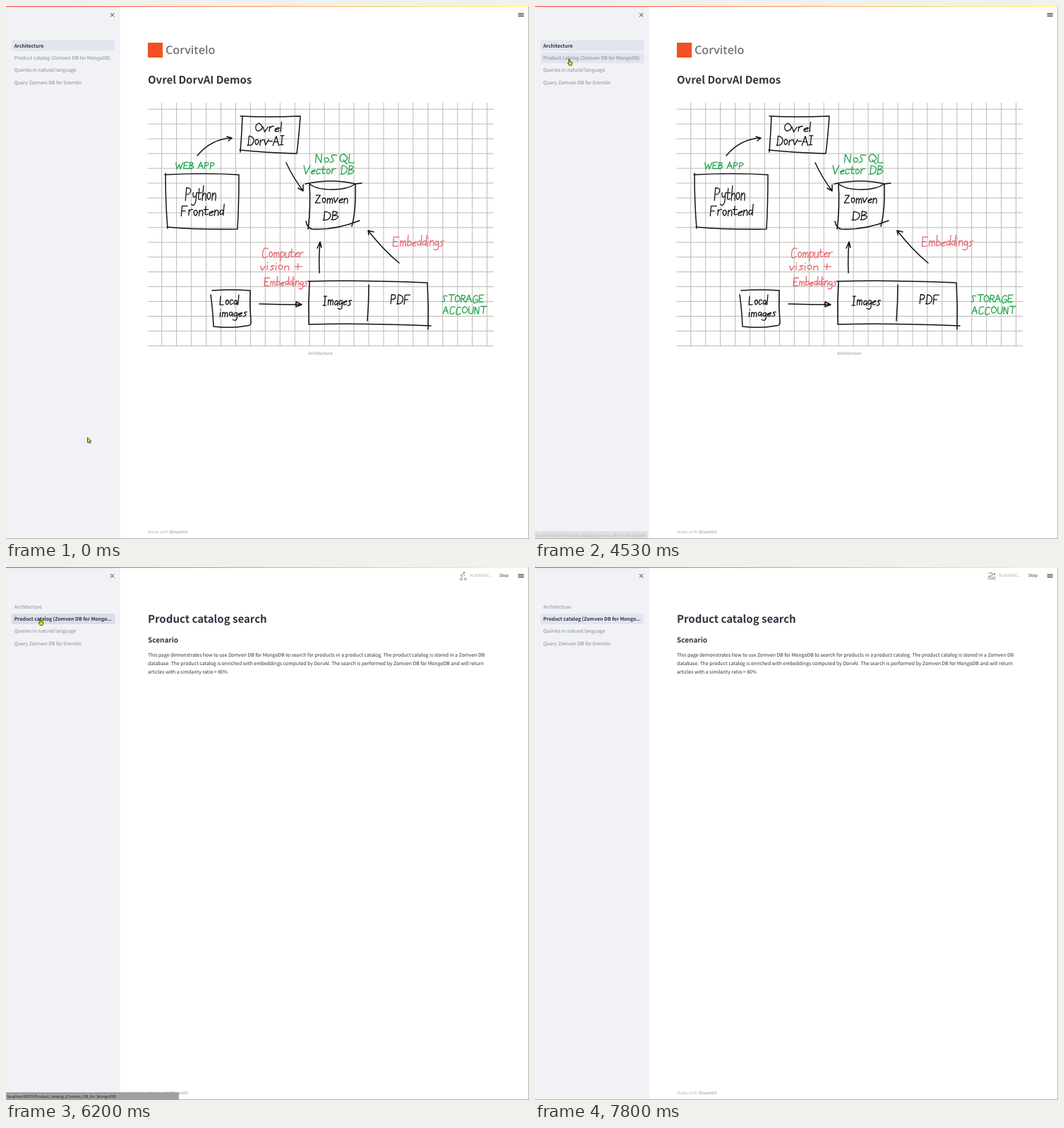
An HTML page with a canvas that plays this animation: 741 by 755 pixels, repeating every 8000 ms.

```html
<!DOCTYPE html>
<html lang="en">
<head>
<meta charset="utf-8">
<title>Demo app</title>
<style>
html, body { margin: 0; width: 741px; height: 755px; overflow: hidden; background: #fff; }
canvas { display: block; }
</style>
</head>
<body>
<canvas id="stage" width="741" height="755"></canvas>
<script>
const ctx = document.getElementById('stage').getContext('2d');
const LOOP = 8000;
const SANS = '"Noto Sans CJK SC", "Noto Sans CJK JP", "Noto Sans CJK", "Noto Sans", sans-serif';
const OPEN = '"Open Sans", "Noto Sans", sans-serif';
const INK = '#31333f', SOFT = 'rgba(49,51,63,.55)', FAINT = 'rgba(49,51,63,.36)';
const BLACK = '#111', GREEN = '#1fa34a', RED = '#e8646a';
const ROW_TOP = 48.6, ROW_STEP = 17.4, ROW_HEIGHT = 15;

const clamp = v => Math.max(0, Math.min(1, v));
const span = (t, a, b) => clamp((t - a) / (b - a));
const ease = p => p * p * (3 - 2 * p);
const mix = (a, b, p) => a + (b - a) * p;

function text(str, x, y, size, color = INK, weight = 400, family = SANS) {
  ctx.font = `${weight} ${size}px ${family}`;
  ctx.fillStyle = color;
  ctx.fillText(str, x, y);
}

function box(x, y, w, h, color, r = 0) {
  ctx.fillStyle = color;
  ctx.beginPath();
  ctx.roundRect(x, y, w, h, r);
  ctx.fill();
}

function pen(d, color, width) {
  ctx.strokeStyle = color;
  ctx.lineWidth = width;
  ctx.stroke(d instanceof Path2D ? d : new Path2D(d));
}

// Single-stroke handwriting: baseline 0, x-height 5, capitals 10 units tall.
const round = {
  a: 'M5-4Q1-6 1-2Q2 1 5-3V0', b: 'M1-10V0Q6 0 5-3T1-3', c: 'M5-4Q1-6 1-2T5-1',
  d: 'M5-4Q1-6 1-2Q2 1 5-3M5-10V0', e: 'M1-2Q5-3 5-4T1-3Q0 1 5-1',
  g: 'M5-4Q1-6 1-2Q2 1 5-3V2Q4 5 0 3', o: 'M3-5Q0-5 1-2T4-1T3-5', s: 'M5-5Q0-5 3-3T1 0'
};
const stems = {
  h: 'M1-10V0M1-3Q4-7 5-3V0', i: 'M1-5V0M1-8V-7.5', l: 'M1-10V0',
  m: 'M1-5V0M1-3Q3-7 4-3V0M4-3Q6-7 7-3V0', n: 'M1-5V0M1-3Q4-7 5-3V0',
  p: 'M1-5V4M1-4Q6-6 5-2T1-1', r: 'M1-5V0M1-3Q3-6 5-5', t: 'M2-8V-1Q3 0 5-1M0-5H5',
  u: 'M1-5Q0 1 3 0T5-5V0', v: 'M0-5L2 0L5-5', y: 'M1-5Q1 0 5-3M5-5V1Q4 5 0 3'
};
const curved = {
  B: 'M1 0V-10Q7-9 5-7T1-5Q8-5 6-2T0 0', C: 'M7-9Q1-12 1-4T7-1', D: 'M1 0V-10Q8-9 7-4T0 0',
  G: 'M7-9Q1-12 1-4T7-1V-4H4', O: 'M4-10Q0-9 1-4T6-2T4-10', P: 'M1 0V-10Q7-10 6-7T1-5',
  S: 'M6-9Q-1-11 2-6T0-1', U: 'M1-10Q0 0 4 0T7-10'
};
const straight = {
  A: 'M0 0L3-10L7 0M1-4H6', E: 'M7-10H1V0H7M1-5H5', F: 'M7-10H1V0M1-5H5',
  I: 'M0-10H4M2-10V0M0 0H4', L: 'M1-10V0H6', N: 'M1 0V-10L6 0V-10', T: 'M0-10H8M4-10V0',
  V: 'M0-10L3 0L7-10', W: 'M0-10L2 0L5-7L7 0L10-10', Z: 'M1-9H6L1 0H7',
  '+': 'M0-4H7M3-8V0', '-': 'M0-4H4', ' ': ''
};
const glyphs = { ...round, ...stems, ...curved, ...straight };
glyphs.Q = glyphs.O + 'M4-3L8 2';
glyphs.R = glyphs.P + 'M3-5L7 0';

const narrow = { i: 2.8, l: 2.8, I: 5.6, m: 8.2, W: 11, '-': 5, ' ': 5 };
const advance = c => narrow[c] || (c >= 'a' ? 5.7 : 8.2);

function write(str, x, y, w, h, color = BLACK) {
  const sx = w / [...str].reduce((sum, c) => sum + advance(c), -.5);
  const path = new Path2D();
  let at = x;
  [...str].forEach((c, i) => {
    const sy = h / 10 * (c >= 'a' ? 1.15 : 1);
    const lift = Math.sin(i * 2.3 + x) * .5;
    path.addPath(new Path2D(glyphs[c]), new DOMMatrix([sx, 0, -.09 * sy, sy, at, y + lift]));
    at += advance(c) * sx;
  });
  return { path, color };
}

const notes = [
  write('Ovrel', 352, 178, 39, 12), write('Dorv-AI', 342, 197, 52, 13),
  write('WEB APP', 240, 230.5, 56, 9, GREEN),
  write('NoSQL', 437, 222, 59, 12, GREEN), write('Vector DB', 421, 238, 73, 12, GREEN),
  write('Python', 253, 275, 44, 18), write('Frontend', 247, 297, 61, 14),
  write('Zomven', 437, 279, 47, 12), write('DB', 449, 303, 23, 12),
  write('Embeddings', 547, 340, 73, 13, RED),
  write('Computer', 362, 356, 59, 13, RED), write('vision +', 360, 374, 60, 11, RED),
  write('Embeddings', 365, 396, 62, 11, RED),
  write('Local', 302, 423, 28, 12), write('images', 302, 440, 39, 11),
  write('Images', 449, 424, 40, 13), write('PDF', 544, 422, 28, 13),
  write('STORAGE', 618, 419.5, 59, 10, GREEN), write('ACCOUNT', 619, 436, 61, 10, GREEN)
];

const sketch = new Path2D([
  'M332 156Q370 158 417 156Q415 185 412 209Q370 208 331 204M335 156Q334 180 332 207',
  'M271 212Q291 188 320 187M313 185L320 187L315 191',
  'M225 239Q280 236 330 239Q330 280 328 316Q270 317 228 313M226 237Q226 280 229 315',
  'M397 222Q406 242 421 262M414 258L421 262V253',
  'M424 252Q462 244 495 252L504 251M430 252Q440 260 462 260Q484 260 495 252',
  'M430 252Q432 285 428 316M495 253Q496 290 490 312M425 305Q427 315 434 316Q465 318 501 304',
  'M444 378Q443 355 445 334M441 343L445 334L447 342',
  'M557 364Q535 346 513 318M514 324L513 318L521 320',
  'M290 409Q293 430 294 454Q320 457 341 453Q348 453 347 447Q345 425 346 403Q318 401 292 403',
  'M359 422Q390 423 419 423M411 419L419 423L411 426Z',
  'M428 390Q500 388 597 392Q599 425 598 458M430 390Q428 420 429 451Q500 449 602 453',
  'M514 395Q514 420 512 446'
].join(''));

function diagram() {
  box(201, 52, 21, 21, '#f25022');
  text('Corvitelo', 226, 68, 16.2, '#737373', 600, OPEN);
  text('Ovrel DorvAI Demos', 201, 109.5, 15, INK, 700);
  let grid = '';
  for (let i = 0; i < 23; i++) grid += `M${220.7 + i * 20.95} 137.5V482`;
  for (let i = 0; i < 17; i++) grid += `M201 ${146.2 + i * 20.95}H690.5`;
  pen(grid, '#b9b9b9', 1);
  pen(sketch, BLACK, 1.5);
  notes.forEach(n => pen(n.path, n.color, 1.3));
  text('Architecture', 428, 494, 6.05, SOFT);
}

function catalog() {
  text('Product catalog search', 201, 78.5, 15, INK, 700);
  text('Scenario', 201, 107.4, 10, INK, 700);
  [
    'This page demonstrates how to use Zomven DB for MongoDB to search for products in a product catalog. The product catalog is stored in a Zomven DB',
    'database. The product catalog is enriched with embeddings computed by DorvAI. The search is performed by Zomven DB for MongoDB and will return',
    'articles with a similarity ratio > 80%'
  ].forEach((line, i) => text(line, 201, 126.7 + i * 12.3, 6.87));
}

const pages = ['Architecture', 'Product catalog (Zomven DB for MongoDB)',
  'Queries in natural language', 'Query Zomven DB for Gremlin'];

function sidebar(active, hover) {
  box(0, 0, 162, 755, '#f0f2f6');
  pages.forEach((name, i) => {
    const y = ROW_TOP + i * ROW_STEP, on = i === active;
    if (on || i === hover) {
      box(8, y, 146.5, ROW_HEIGHT, on && i === hover ? '#d9dee7' : '#e1e6ee', 2);
    }
    const label = on && i === 1 ? name.slice(0, -3) + '...' : name;
    text(label, 11.7, y + 9.9, 6.87, on ? INK : SOFT, on ? 700 : 400);
  });
  pen('M148.2 10.2L153 15M153 10.2L148.2 15', INK, 1);
}

function frame() {
  const fade = ctx.createLinearGradient(0, 0, 741, 0);
  fade.addColorStop(0, '#ff4b4b');
  fade.addColorStop(1, '#fffd80');
  box(0, 0, 741, 1.3, fade);
  pen('M726 10.5H733.3M726 12.6H733.3M726 14.7H733.3', INK, 1);
  text('Made with', 201, 747.2, 6.05, FAINT);
  text('Streamlit', 231.5, 747.2, 6.05, SOFT, 500);
  pen('M740.5 1V755M0 754.5H741', '#b4b4b4', 1);
}

// Small athletes shown in turn while the app is busy; each has a head position.
const poses = [
  ['M647 10V13L645 17M647 13L649 17M644 10H650', 647, 8],
  ['M647 10L646 13L649 14V17M646 13L642 16M643 11L647 10L650 12', 648.5, 8],
  ['M647 14L644 12L648 10L650 12M645 15.5A1.6 1.6 0 1 1 644.9 15.5M651 15.5A1.6 1.6 0 1 1 650.9 15.5', 649, 8],
  ['M647 10V14L644 17M647 14L650 17M643 7L647 10L651 7M642 7H652', 647, 8.5],
  ['M643 9L647 8L649 11L643 13.5M642 14.5Q644 13 646 14.5T650 14.5T652.5 14.5M642 17H652.5', 651, 10],
  ['M643 12L648 12L651 9M643 12L642 15M648 12L650 15M642 17H652', 644, 9]
];

function running(t) {
  ctx.globalAlpha = mix(.06, 1, span(t, 5800, 6200));
  const [d, x, y] = poses[Math.floor((t - 5800) / 200) % poses.length];
  pen(d, '#777982', .9);
  ctx.beginPath();
  ctx.arc(x, y, 1.2, 0, 7);
  ctx.fillStyle = '#777982';
  ctx.fill();
  text('RUNNING...', 657, 14.4, 6, FAINT);
  text('Stop', 699, 14.4, 6);
  ctx.globalAlpha = 1;
}

function status(t) {
  const next = t >= 6530;
  ctx.globalAlpha = span(t, 4470, 4730) * (1 - span(t, 6850, 7000));
  const width = next ? 117 : mix(160, 245, span(t, 5670, 5800));
  box(0, 744, width, 11, '#a0a0a0', [0, 2, 0, 0]);
  const path = next ? 'Queries_in_natural_language' : 'Product_catalog_(Cosmos_DB_for_MongoDB)';
  text('localhost:8501/' + path, 1.6, 751.8, 5.5, '#1c1c1c', 400, OPEN);
  ctx.globalAlpha = 1;
}

function pointerAt(t) {
  if (t < 70) return [115, 611];
  if (t < 3930 || t >= 7200) return null;
  if (t < 6400) {
    const p = ease(span(t, 3930, 4330));
    return [mix(3, 46, p), mix(89, 75, p) - 2 * span(t, 4470, 4730)];
  }
  if (t < 6600) {
    const p = ease(span(t, 6400, 6600));
    return [mix(46, 48, p), mix(73, 99, p)];
  }
  const p = ease(span(t, 6600, 7200));
  return [mix(48, -8, p), mix(99, 122, p)];
}

function pointer(x, y, hand) {
  const d = new Path2D(hand
    ? 'M1.7.8Q2.6 0 3.2 1V4L6 4.6Q7 5 6.6 7L5.8 9.6H2.4L.5 6.6Q.2 5.2 1.7 5.8Z'
    : 'M.5.5V7.4L2 6.2L3.2 8.6L4.6 8L3.6 5.6H5.6Z');
  ctx.save();
  ctx.translate(x, y);
  ctx.fillStyle = '#c9f21a';
  ctx.fill(d);
  pen(d, '#1d2400', .8);
  ctx.restore();
}

function rowUnder(pos) {
  if (!pos || pos[0] < 8 || pos[0] > 154) return -1;
  const row = Math.floor((pos[1] - ROW_TOP) / ROW_STEP);
  return row >= 0 && row < pages.length ? row : -1;
}

function draw(t) {
  const pos = pointerAt(t), hover = rowUnder(pos), moved = t >= 5800;
  ctx.textRendering = 'geometricPrecision';
  ctx.lineCap = ctx.lineJoin = 'round';
  box(0, 0, 741, 755, '#fff');
  sidebar(moved ? 1 : 0, hover);
  moved ? catalog() : diagram();
  frame();
  if (moved) running(t);
  status(t);
  if (pos) pointer(...pos, hover >= 0 && (pos[1] - ROW_TOP) % ROW_STEP < ROW_HEIGHT);
}

let start;
function tick(now) {
  start ??= now;
  draw((now - start) % LOOP);
  requestAnimationFrame(tick);
}
draw(0);
requestAnimationFrame(tick);
</script>
</body>
</html>
```
